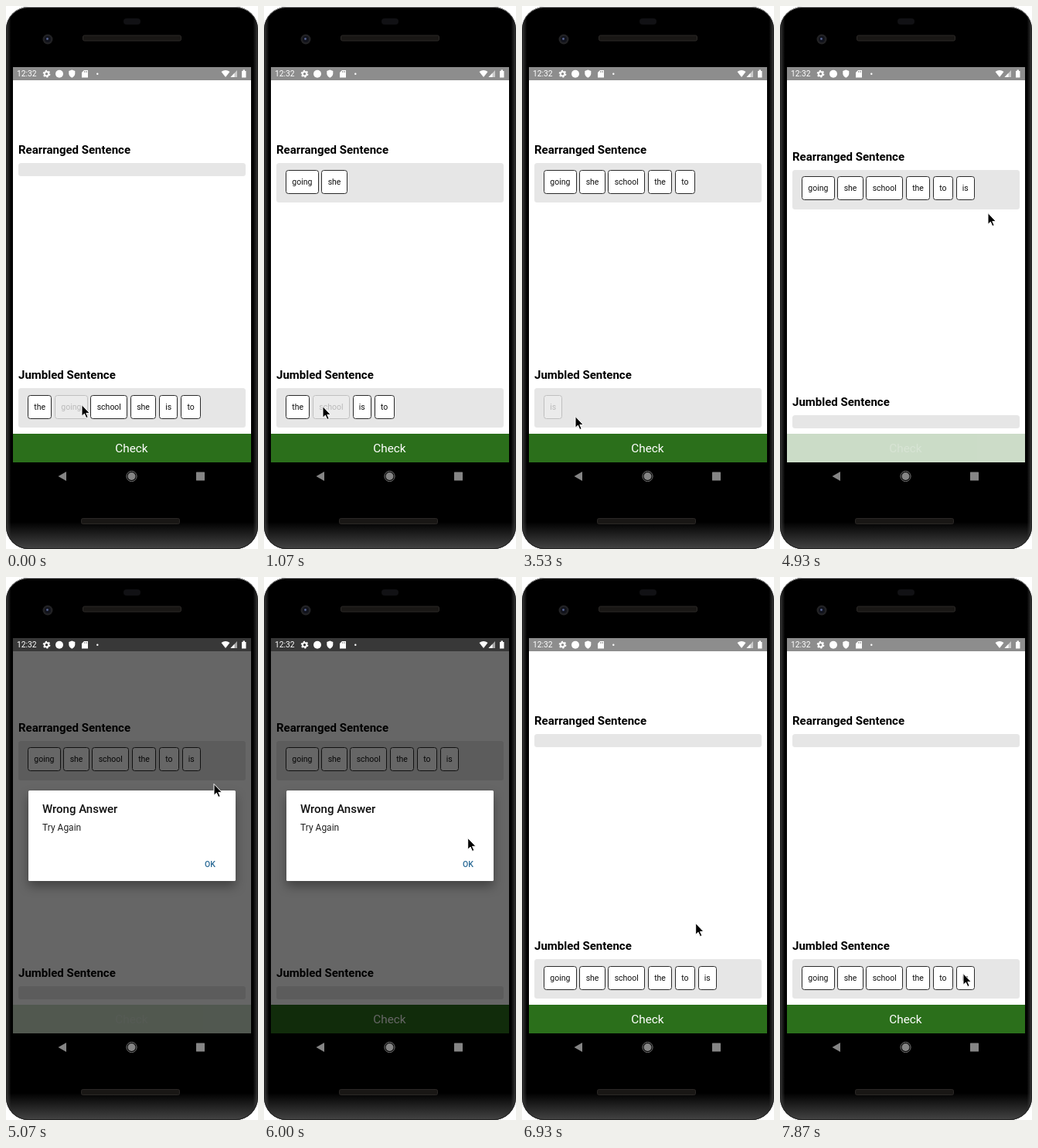
An HTML page that plays this animation: 326x702 px, repeating every 8 s.

```html
<!DOCTYPE html>
<html lang="en">
<head>
<meta charset="utf-8">
<title>Sentence game</title>
<style>
  html, body { margin: 0; width: 100%; height: 100%; overflow: hidden; background: #fff; }
  #stage { position: relative; width: 326px; height: 702px; overflow: hidden; font: 10.5px/1 Roboto, sans-serif; color: #111; }
  #stage > * { position: absolute; }
  svg { left: 0; top: 0; overflow: visible; }
  #screen, #bar, #dim, #check { left: 9px; top: 79px; width: 308px; height: 511px; }
  #screen { background: #fff; }
  #bar { height: 17px; background: #8d8d8d; }
  #dim { background: #000; }
  #check { top: 553px; height: 37px; background: #2b6f1b; font-size: 15.3px; line-height: 38px; text-align: center; text-indent: -1px; }
  h2 { left: 16px; margin: 0; font: 700 15px/20px Roboto, sans-serif; color: #000; white-space: nowrap; }
  .tray { left: 16px; width: 293.5px; box-sizing: border-box; padding: 8.3px 12px; border-radius: 3.5px; background: #e6e6e6; display: flex; gap: 3.75px; }
  .word { height: 31px; line-height: 29px; box-sizing: border-box; padding: 0 7.25px; border: 1px solid #2a2a2a; border-radius: 3.5px; background: #fff; }
  #dialog { left: 28.5px; top: 275.5px; width: 268.5px; height: 117.5px; border-radius: 1.5px; background: #fff; box-shadow: 0 7px 14px rgba(0, 0, 0, .36); }
  #dialog * { position: absolute; left: 18.5px; white-space: nowrap; line-height: 20px; }
  #dialog b { top: 14px; font-size: 15px; font-weight: 500; }
  #dialog span { top: 38px; font-size: 12px; color: #222; }
  #dialog i { left: 228.5px; top: 86.5px; font-style: normal; font-weight: 500; color: #2a6a96; }
  #clock { left: 14px; top: 79px; font-size: 10.3px; line-height: 17px; color: #fff; }
</style>
</head>
<body>
<div id="stage">
  <svg width="326" height="702">
    <defs>
      <linearGradient id="sides">
        <stop offset="0" stop-color="#3a3a3a"/><stop offset=".02" stop-color="#000"/>
        <stop offset=".98" stop-color="#000"/><stop offset="1" stop-color="#3a3a3a"/>
      </linearGradient>
      <linearGradient id="base" x2="0" y2="1">
        <stop offset=".95" stop-color="#444" stop-opacity="0"/><stop offset="1" stop-color="#444"/>
      </linearGradient>
      <linearGradient id="rim" x2="0" y2="1">
        <stop offset="0" stop-color="#999"/><stop offset=".03" stop-color="#222"/>
      </linearGradient>
    </defs>
    <rect y="1" width="326" height="701" rx="29" fill="url(#sides)"/>
    <rect y="1" width="326" height="701" rx="29" fill="url(#base)"/>
    <rect x=".5" y="1.5" width="325" height="700" rx="28.5" fill="none" stroke="url(#rim)"/>
    <rect x="152" y="16" width="22" height="8" rx="4" fill="#111114"/>
    <circle cx="54" cy="43" r="6.5" fill="#222224"/>
    <circle cx="54" cy="43" r="4" fill="#11131c"/>
    <circle cx="53.5" cy="42.5" r="1.4" fill="#56628f"/>
    <g fill="#191715" stroke="#2b2826">
      <rect x="99.5" y="38" width="127" height="7" rx="2"/>
      <rect x="97.5" y="662.5" width="127" height="7" rx="2"/>
    </g>
    <g fill="#858585">
      <path d="M67.5 608 78 602V614Z"/>
      <circle cx="162.5" cy="608" r="5"/>
      <circle cx="162.5" cy="608" r="6.6" fill="none" stroke="#777"/>
      <rect x="246" y="602.5" width="11" height="11" rx=".5"/>
    </g>
  </svg>

  <div id="screen"></div>
  <div id="bar"></div>
  <h2 id="topTitle">Rearranged Sentence</h2>
  <div class="tray" id="topTray"></div>
  <h2 id="lowTitle">Jumbled Sentence</h2>
  <div class="tray" id="lowTray"></div>
  <div id="check">Check</div>
  <div id="dim"></div>
  <div id="dialog"><b>Wrong Answer</b><span>Try Again</span><i>OK</i></div>

  <div id="clock">12:32</div>
  <svg width="326" height="702" fill="#fff">
    <circle cx="52.5" cy="87.7" r="2.7" fill="none" stroke="#fff" stroke-width="2"/>
    <circle cx="52.5" cy="87.7" r="4.2" fill="none" stroke="#fff" stroke-width="1.4" stroke-dasharray="2.2"/>
    <circle cx="69" cy="87.7" r="5"/>
    <path d="M85.3 82.5 89.3 84V87.5Q89 91 85.3 92.8 81.6 91 81.3 87.5V84Z"/>
    <path d="M101 83H106V92.5H98V86Z"/>
    <path d="M101.5 84V86M103 84V86M104.5 84V86" stroke="#8d8d8d" stroke-width=".7"/>
    <circle cx="118.3" cy="87.7" r="1.2"/>
    <path d="M278.5 85Q284 81 289.5 85L284 92Z"/>
    <path d="M299 83V92H290.5Z" opacity=".55"/>
    <path d="M295.5 86.7V92H290.5Z"/>
    <path d="M305 84H306.5V82.5H309V84H310.5V92.5H305Z"/>
  </svg>

  <svg id="cursor" width="14" height="20">
    <path d="M0 .5V15.3L3.4 12.2 5.8 17.6 8.2 16.5 5.8 11.4H10.3Z" stroke="#fff" stroke-linejoin="round"/>
  </svg>
</div>
<script>
  const LOOP = 8000, SHOW = 4960, HIDE = 6470, RESET = HIDE + 30, HOLD = 250;
  const $ = id => document.getElementById(id);

  // Pointer stops: arrival time, tip position, word tapped on arrival
  const stop = (at, x, y, word) => ({ at, x, y, word });
  const checkTap = stop(4330, 165, 565);
  const stops = [
    stop(-130, 98, 515, 'going'),
    stop(560, 129, 516, 'she'),
    stop(960, 76, 517, 'school'),
    stop(1790, 47, 518, 'the'),
    stop(2650, 70, 519),
    stop(2870, 70, 519, 'to'),
    stop(3360, 45, 520, 'is'),
    stop(3520, 69, 530),
    checkTap,
    stop(4900, 269, 267),
    stop(6100, 261, 372),
    stop(7130, 172, 556),
    stop(7730, 237, 512)
  ];
  const taps = stops.filter(s => s.word);
  const order = taps.map(s => s.word);
  const jumbled = 'the going school she is to'.split(' ');

  const ramp = (t, from, time) => Math.min(1, Math.max(0, (t - from) / time));
  const ease = p => p * p * (3 - 2 * p);

  // Rest at each stop, then glide: farther trips take longer
  function pointer(t) {
    const i = stops.findLastIndex(s => s.at <= t);
    const a = stops[i], b = stops[i + 1] || a;
    const time = Math.min(b.at - a.at, 150 + Math.hypot(b.x - a.x, b.y - a.y)) || 1;
    const p = ease(ramp(t, b.at - time, time));
    return [a.x + (b.x - a.x) * p, a.y + (b.y - a.y) * p];
  }

  const words = {};
  for (const text of order) {
    const el = words[text] = document.createElement('div');
    el.className = 'word';
    el.textContent = text;
  }

  function place(name, titleY, list) {
    const tray = $(name + 'Tray');
    $(name + 'Title').style.top = titleY + 'px';
    tray.style.top = titleY + 27.3 + 'px';
    tray.style.height = (list.length ? 51 : 16) + 'px';
    tray.replaceChildren(...list.map(w => words[w]));
  }

  let lastKey = '';
  function layout(t) {
    const playing = t < RESET;
    const moved = playing ? order.filter((w, i) => t >= taps[i].at + HOLD) : [];
    const left = playing ? jumbled.filter(w => !moved.includes(w)) : order;
    const key = moved + '|' + left;
    if (key === lastKey) return;
    lastKey = key;
    place('top', left.length ? 176 : 184.7, moved);
    place('low', left.length ? 467 : 502, left);
  }

  function draw(t) {
    layout(t);
    for (const { word, at } of taps)
      words[word].style.opacity = t < at + HOLD ? 1 - .8 * ramp(t, at, 100) : 1;

    const check = 1 - .76 * (ramp(t, checkTap.at, 130) - ramp(t, 5400, 200));
    $('check').style.opacity = check;
    $('check').style.color = `rgba(255, 255, 255, ${check})`;
    $('dim').style.opacity = .6 * (ramp(t, SHOW, 100) - ramp(t, HIDE, 185));
    $('dialog').style.opacity = ramp(t, SHOW, 90) - ramp(t, HIDE, 130);

    const [x, y] = pointer(t);
    $('cursor').style.transform = `translate(${x}px, ${y}px)`;
  }

  const start = performance.now();
  function tick() {
    draw((performance.now() - start) % LOOP);
    requestAnimationFrame(tick);
  }
  tick();
</script>
</body>
</html>
```
